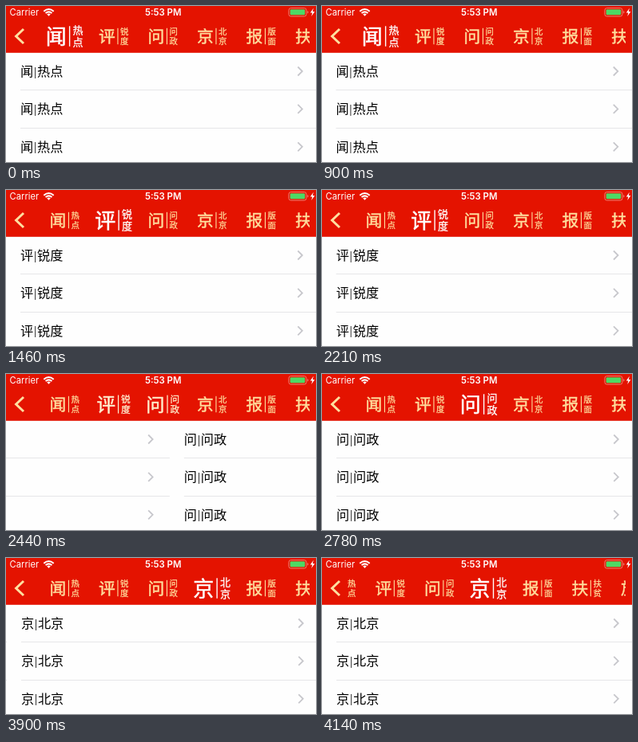
Animation, 388 px wide and 196 px high, one loop 5.13 s. Source, as an HTML page:

```html
<!DOCTYPE html>
<html lang="zh-CN">
<head>
<meta charset="utf-8">
<style>
  html, body { margin: 0; width: 100%; height: 100%; overflow: hidden; background: #fff; }
  svg { display: block; width: 388px; height: 196px; }
  text { font-family: "Noto Sans CJK SC", "Noto Sans CJK", sans-serif; }
  .status { font-family: Inter, Roboto, sans-serif; fill: #fff; }
</style>
</head>
<body>
<svg viewBox="0 0 388 196" xmlns="http://www.w3.org/2000/svg">
  <defs><clipPath id="strip"><rect x="30" y="20" width="350" height="38"/></clipPath></defs>
  <rect width="388" height="196" fill="#fefefe"/>
  <g id="pages"></g>
  <rect width="388" height="58.8" fill="#e41300"/>
  <text class="status" x="4.6" y="12" font-size="11.2">Carrier</text>
  <g fill="none" stroke="#fff" stroke-width="2">
    <path d="M47.3 6.8Q53.5 1.2 59.7 6.8"/>
    <path d="M49.6 9.1Q53.5 5.7 57.4 9.1"/>
  </g>
  <path d="M51.2 10.3Q53.5 8.5 55.8 10.3L53.5 12.7Z" fill="#fff"/>
  <text class="status" x="196.7" y="12" font-size="11.4" font-weight="600" text-anchor="middle">5:53 PM</text>
  <rect x="353.9" y="2.6" width="22" height="10.4" rx="2.6" fill="none" stroke="#ee7d70"/>
  <rect x="355.6" y="4.3" width="18.6" height="7" rx="1.2" fill="#4cd964"/>
  <path d="M377.2 6v3.6q1.3-.5 1.3-1.8t-1.3-1.8" fill="#ee7d70"/>
  <path d="M384.8 2.8L380.8 8.5H383.4L382.2 13L386.4 7H383.8Z" fill="#fff"/>
  <path d="M22 29L12.6 38L22 47" fill="none" stroke="#ffdf9f" stroke-width="3"/>
  <g clip-path="url(#strip)"><g id="tabs"></g></g>
</svg>
<script>
const LOOP = 5130, PAGE_W = 392, TAB_X = 73.8, TAB_PITCH = 61.5;
const TITLES = ["闻热点", "评锐度", "问问政", "京北京", "报版面", "扶扶贫", "旅旅游"];
// Each swipe advances one page in discrete steps.
const SWIPES = [
  { start: 900, end: 1460, steps: 10, bend: 0.7 },
  { start: 2210, end: 2780, steps: 11, bend: 0.726 },
  { start: 3410, end: 3960, steps: 10, bend: 0.636 }
];
const STRIP = { start: 3960, step: 45, steps: 5, shift: -49.6 };
const GOLD = [255, 222, 158];
const LEAD = 0.15;

function add(parent, tag, attrs, text = "") {
  const node = document.createElementNS("http://www.w3.org/2000/svg", tag);
  for (const key in attrs) node.setAttribute(key, attrs[key]);
  node.textContent = text;
  return parent.appendChild(node);
}

function makeTab([main, upper, lower]) {
  const g = add(document.getElementById("tabs"), "g", { "text-anchor": "middle" });
  add(g, "text", { x: -8.9, y: 7.6, "font-size": 20.8, "stroke-width": 0.45 }, main);
  add(g, "rect", { x: 4.1, y: -10.2, width: 1.1, height: 20.4, stroke: "none" });
  add(g, "text", { x: 12.9, y: -2.2, "font-size": 10.4, "stroke-width": 0.25 }, upper);
  add(g, "text", { x: 12.9, y: 9.8, "font-size": 10.4, "stroke-width": 0.25 }, lower);
  return g;
}

function makePage([main, upper, lower]) {
  const g = add(document.getElementById("pages"), "g", {});
  for (let row = 0; row < 3; row++) {
    const y = 82 + row * 47.4;
    const label = add(g, "text", { x: 18, y: y + 6, "font-size": 16.2, fill: "#000" }, main);
    add(label, "tspan", { x: 34.9, dy: -1.4, "font-size": 12.5 }, "|");
    add(label, "tspan", { x: 39, dy: 1.4 }, upper + lower);
    add(g, "path", { d: `M365.3 ${y - 5.5}l5.5 5.5l-5.5 5.5`, fill: "none", stroke: "#c7c7cc", "stroke-width": 1.8 });
    if (row < 2) add(g, "rect", { x: 18, y: 105 + row * 48, width: PAGE_W - 18, height: 1, fill: "#e6e6e8" });
  }
  return g;
}

const tabs = TITLES.map(makeTab);
const pages = TITLES.slice(0, 4).map(makePage);

const smoother = v => v * v * v * (v * (v * 6 - 15) + 10);

function swipeProgress(t, { start, end, steps, bend }) {
  if (t < start) return 0;
  if (t >= end) return 1;
  const k = Math.floor((t - start) / (end - start) * steps + LEAD);
  return smoother(Math.min(1, (k + LEAD) / (steps + LEAD)) ** bend);
}

function stripOffset(t) {
  if (t < STRIP.start) return 0;
  const u = Math.min(1, (Math.floor((t - STRIP.start) / STRIP.step) + 1) / STRIP.steps);
  return STRIP.shift * u * u * (3 - 2 * u);
}

function draw(t) {
  const position = SWIPES.reduce((sum, swipe) => sum + swipeProgress(t, swipe), 0);
  pages.forEach((page, i) => {
    page.setAttribute("transform", `translate(${(i - position) * PAGE_W} 0)`);
  });
  const offset = stripOffset(t);
  tabs.forEach((tab, i) => {
    const active = Math.max(0, 1 - Math.abs(i - position));
    const x = TAB_X + i * TAB_PITCH + offset;
    const color = `rgb(${GOLD.map(c => Math.round(c + (255 - c) * active))})`;
    tab.setAttribute("transform", `translate(${x} 38) scale(${1 + active * 0.25})`);
    tab.setAttribute("fill", color);
    tab.setAttribute("stroke", color);
  });
}

const origin = performance.now();
function frame() {
  draw((performance.now() - origin) % LOOP);
  requestAnimationFrame(frame);
}
frame();
</script>
</body>
</html>
```
